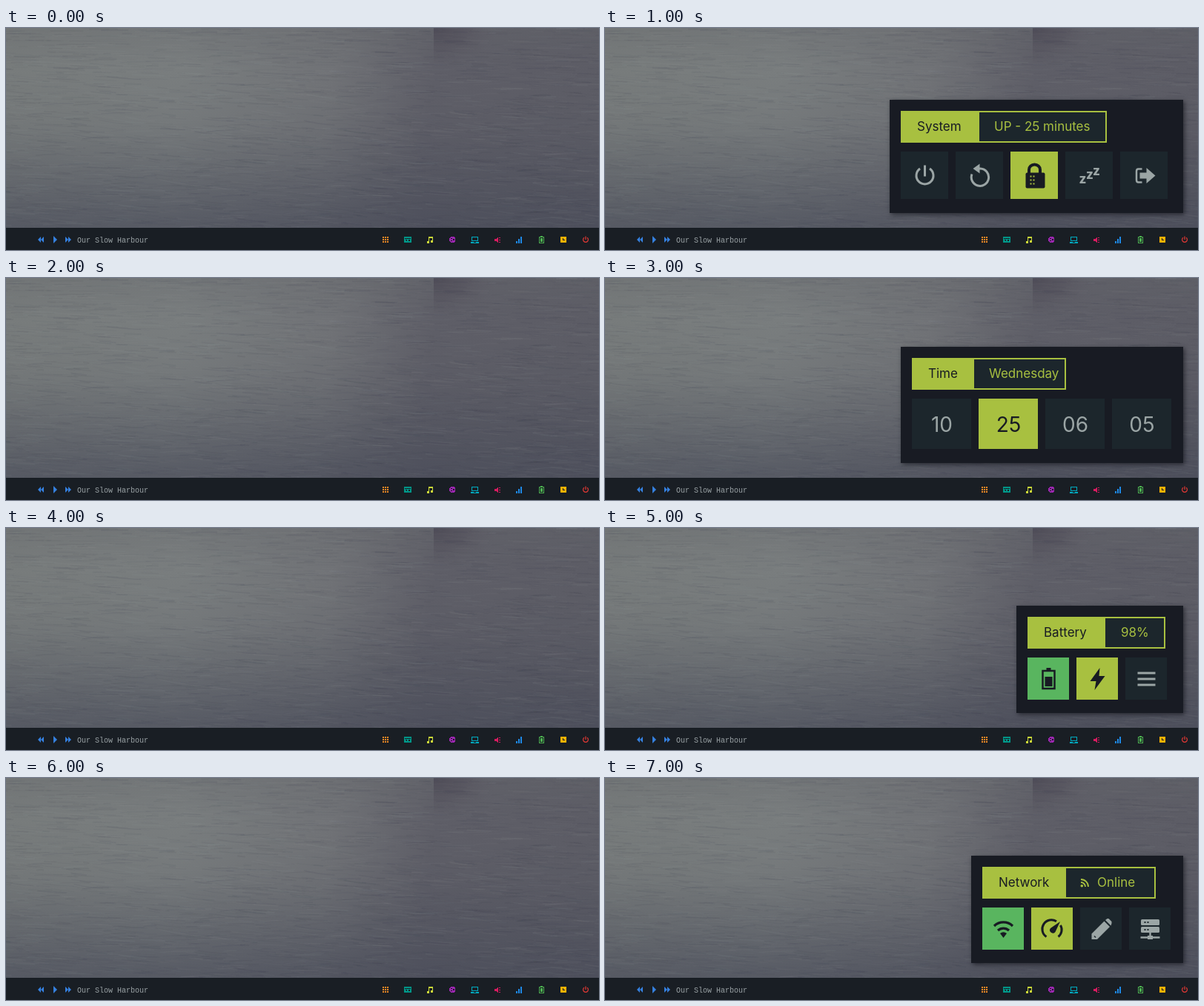
Recreate the animation shown at these times as an HTML page with a canvas. Size 800 by 300 pixels, loop 8000 ms.

```html
<!DOCTYPE html>
<html>
<head>
<meta charset="utf-8">
<style>
  html, body { margin: 0; width: 100%; height: 100%; overflow: hidden; background: #191e24; }
  canvas, svg { position: absolute; left: 0; top: 0; }
  .panel { display: none; filter: drop-shadow(2px 2.5px 3px rgba(10, 12, 18, .6)); }
  .panel text { font: 17px Inter, sans-serif; }
  .panel .big { font-size: 28px; text-anchor: middle; }
  .panel .zzz { font-weight: 800; }
  .song { font: 10px "Liberation Mono", monospace; fill: #9ba3a6; }
  .line { fill: none; stroke: currentColor; stroke-width: 3; }
</style>
</head>
<body>
<canvas id="water" width="800" height="270"></canvas>
<svg id="ui" width="800" height="300" viewBox="0 0 800 300"></svg>
<script>
const LIME = '#a8c040', GREEN = '#59b55f', DARK = '#181b23', TILE = '#1c262c', GREY = '#9ba5a5';

function paintWater() {
  const c = document.getElementById('water').getContext('2d');
  const fill = (gradient, stops) => {
    stops.forEach(([at, color]) => gradient.addColorStop(at, color));
    c.fillStyle = gradient;
    c.fillRect(0, 0, 800, 270);
  };
  fill(c.createLinearGradient(0, 0, 800, 100),
    [[0, '#777b7b'], [.3, '#797d7e'], [.55, '#707276'], [.72, '#5e5e67'], [1, '#5c5c65']]);
  fill(c.createLinearGradient(0, 0, 0, 270),
    [[0, 'rgba(100,102,106,.3)'], [.2, 'rgba(100,102,106,0)'], [.5, 'rgba(72,75,87,.1)'], [1, 'rgba(70,73,87,.68)']]);
  c.save();
  c.translate(577, 0);
  c.scale(1, .6);
  fill(c.createRadialGradient(0, 0, 0, 0, 0, 85),
    [[0, 'rgba(70,67,80,.75)'], [.5, 'rgba(78,74,86,.4)'], [1, 'rgba(84,80,92,0)']]);
  c.restore();

  let seed = 7;
  const random = () => (seed = seed * 16807 % 2147483647) / 2147483647;
  for (let i = 0; i < 3600; i++) {
    const x = random() * 840 - 40, y = random() * 270, len = 8 + random() * 38;
    const slope = (random() - .3) * .22 * Math.min(1, y / 110);
    const alpha = .025 + random() * .055;
    c.strokeStyle = random() < .5 ? `rgba(155,160,160,${alpha})` : `rgba(45,47,65,${alpha})`;
    c.lineWidth = .6 + random() * 1.3;
    c.beginPath();
    c.moveTo(x, y);
    c.quadraticCurveTo(x + len / 2, y + slope * len - .6, x + len, y + slope * len);
    c.stroke();
  }
}

const rect = (x, y, w, h, fill = 'currentColor') =>
  `<rect x="${x}" y="${y}" width="${w}" height="${h}" fill="${fill}"/>`;
const path = (d, extra = 'fill="currentColor"') => `<path d="${d}" ${extra}/>`;
const line = (d, width = 3) => path(d, `class="line" style="stroke-width:${width}"`);
const label = (x, y, s, fill = 'currentColor', cls = '') =>
  `<text x="${x}" y="${y}" fill="${fill}" class="${cls}">${s}</text>`;
const at = (x, y, color, body) => `<g transform="translate(${x} ${y})" color="${color}">${body}</g>`;
const big = s => label(0, 10, s, 'currentColor', 'big');
const z = (x, y, size) => `<text x="${x}" y="${y}" class="zzz" style="font-size:${size}px" fill="currentColor">z</text>`;

// Tile icons, drawn around the tile centre
const icons = {
  power: line('M-6.5-9.5A11.5 11.5 0 1 0 6.5-9.5M0-14V1'),
  restart: line('M-10.5-2A11.7 11.7 0 1 0 1-9.5H-3') + path('M-9-9.5L0-16V-3Z'),
  lock: line('M-7.5-3V-8A7.5 7 0 0 1 7.5-8V-3', 4) +
    `<rect x="-12" y="-4" width="26" height="21" rx="2" fill="currentColor"/>` +
    [0, 5, 10].map(y => rect(-6, y, 2, 2, LIME) + rect(-2, y, 2, 2, LIME)).join(''),
  sleep: z(-14, 10, 17) + z(-4.5, 4.5, 17) + z(4.5, -1, 17),
  logout: line('M-3-9H-8Q-10.5-9-10.5-6V6Q-10.5 9-8 9H-3', 2.5) + path('M-6-4H3V-10.5L15 0L3 10.5V4H-6Z'),
  wifi: line('M-12.5-4A18 18 0 0 1 12.5-4M-7.5 2A11 11 0 0 1 7.5 2', 3.2) + path('M-4.5 6Q0 2.5 4.5 6L0 12Z'),
  gauge: line('M-8 10.5A12 12 0 0 1 5.5-10.2M11-5A12 12 0 0 1 8 10.5') +
    path('M10.5-10L4 4A4 4 0 1 1-2.5-1Z'),
  pencil: path('M-13 14V6.5L4-10.5L11.5-3L-5.5 14ZM5.5-12L8-14H10L14-10V-7.5L13-4.5Z') +
    line('M-9.5 9.5L-7.5 11.5', 1.5).replace('class', 'color="#1c262c" class'),
  server: [-13, -3].map(y =>
    `<rect x="-12.5" y="${y}" width="25" height="8" rx="1.5" fill="currentColor"/>` +
    rect(-8, y + 3, 2, 2, TILE) + rect(-4, y + 3, 2, 2, TILE)).join('') +
    line('M0 5V11M-13 11.5H13', 2.4) + rect(-3.5, 9, 7, 5),
  cell: line('M-8-11H8V13H-8Z', 2.5) + rect(-3, -15, 6, 3) + rect(-5, -3, 10, 13),
  charge: path('M3-15L-10 3H-2L-4 15L10-4H2Z'),
  menu: [-8, 0, 8].map(y => rect(-12, y - 1.5, 24, 3)).join('')
};

// Panels always end at the same bottom-right corner; tiles are [icon markup, fill]
function panel({ x, y, split, width, title, status, statusX, tileW, tileH, gap, tiles, extra = '' }) {
  const left = x + 15, top = y + 15;
  const cells = tiles.map(([icon, fill = TILE], i) => {
    const tx = left + i * (tileW + gap), ty = top + 55;
    return rect(tx, ty, tileW, tileH, fill) +
      at(tx + tileW / 2 + .5, ty + tileH / 2 + .5, fill === TILE ? GREY : DARK, icon);
  });
  return `<g class="panel">${rect(x, y, 780 - x, 250 - y, DARK)}` +
    rect(left, top, width, 43, LIME) + rect(left + split, top + 2, width - split - 2, 39, TILE) +
    label(left + 22, top + 27, title, DARK) + label(left + statusX, top + 27, status, LIME) +
    extra + cells.join('') + '</g>';
}

const panels = [
  { x: 384, y: 97, split: 106, width: 278, title: 'System', status: 'UP - 25 minutes', statusX: 126,
    tileW: 64, tileH: 64, gap: 10,
    tiles: [[icons.power], [icons.restart], [icons.lock, LIME], [icons.sleep], [icons.logout]] },
  { x: 399, y: 93, split: 84, width: 208, title: 'Time', status: 'Wednesday', statusX: 104,
    tileW: 80, tileH: 68, gap: 10,
    tiles: [[big('10')], [big('25'), LIME], [big('06')], [big('05')]] },
  { x: 555, y: 105, split: 105, width: 186, title: 'Battery', status: '98%', statusX: 126,
    tileW: 56, tileH: 57, gap: 10,
    tiles: [[icons.cell, GREEN], [icons.charge, LIME], [icons.menu]] },
  { x: 494, y: 105, split: 113, width: 234, title: 'Network', status: 'Online', statusX: 155,
    tileW: 56, tileH: 57, gap: 10,
    extra: at(642, 147, LIME, line('M0-10A10 10 0 0 1 10 0M0-6A6 6 0 0 1 6 0', 1.8) +
      '<circle cx="1.3" cy="-1.3" r="1.8" fill="currentColor"/>'),
    tiles: [[icons.wifi, GREEN], [icons.gauge, LIME], [icons.pencil], [icons.server]] }
];

function bar() {
  const BG = '#191e24', BLUE = '#3580df';
  const dots = [0, 3, 6].flatMap(y => [0, 3, 6].map(x => rect(x, y, 2, 2))).join('');
  return rect(0, 270, 800, 30, BG) +
    at(43, 282, BLUE, path('M4 0V8L0 4ZM8 0V8L4 4Z')) +
    at(64, 281, BLUE, path('M0 0L5 5L0 10Z')) +
    at(80, 282, BLUE, path('M0 0V8L4 4ZM4 0V8L8 4Z')) +
    label(96, 290, 'Our Slow Harbour', '#9ba3a6', 'song') +
    '<g shape-rendering="crispEdges">' +
    at(508, 282, '#f08a24', dots) +
    at(537, 282, '#009688', rect(0, 0, 10, 8) + rect(1, 2, 8, 1, BG) + rect(2, 4, 2, 1, BG) +
      rect(3, 5, 1, 1, BG) + rect(6, 4, 2, 2, BG)) +
    at(568, 282, '#cddc39', rect(2, 0, 6, 2) + rect(2, 0, 1, 8) + rect(7, 0, 1, 7) +
      rect(0, 6, 3, 3) + rect(5, 5, 3, 3)) +
    at(598, 282, '#9c27b0', path('M2 0H6L8 2V6L6 8H2L0 6V2Z') + rect(2, 2, 2, 1, BG) +
      rect(5, 3, 2, 2, BG) + rect(2, 5, 2, 1, BG)) +
    at(627, 282, '#00acc1', rect(1, 0, 9, 6) + rect(2, 1, 7, 4, BG) + rect(0, 7, 11, 2) + rect(4, 7, 3, 1, BG)) +
    at(659, 282, '#d81b60', path('M0 3H2L5 0V9L2 6H0Z') + rect(6, 1, 2, 1) + rect(6, 4, 2, 1) + rect(6, 7, 2, 1)) +
    at(688, 282, '#1e88e5', rect(0, 6, 2, 3) + rect(3, 3, 2, 6) + rect(6, 0, 2, 9)) +
    at(719, 281, '#4caf50', rect(2, 0, 3, 1) + rect(0, 1, 7, 9) + rect(1, 2, 5, 7, BG) + rect(2, 3, 3, 5)) +
    at(748, 282, '#ffb300', rect(0, 0, 8, 8) + rect(3, 2, 1, 3, BG) + rect(3, 4, 3, 1, BG)) +
    '</g>' +
    at(782, 286, '#e53935', line('M-2-2.8A3.4 3.4 0 1 0 2-2.8M0-4.5V0', 1.2));
}

paintWater();
document.getElementById('ui').innerHTML = bar() + panels.map(panel).join('');
const groups = document.querySelectorAll('.panel');
const start = performance.now();

function tick() {
  const second = Math.floor((performance.now() - start) % 8000 / 1000);
  groups.forEach((g, i) => g.style.display = second === i * 2 + 1 ? 'inline' : 'none');
  requestAnimationFrame(tick);
}
tick();
</script>
</body>
</html>
```
